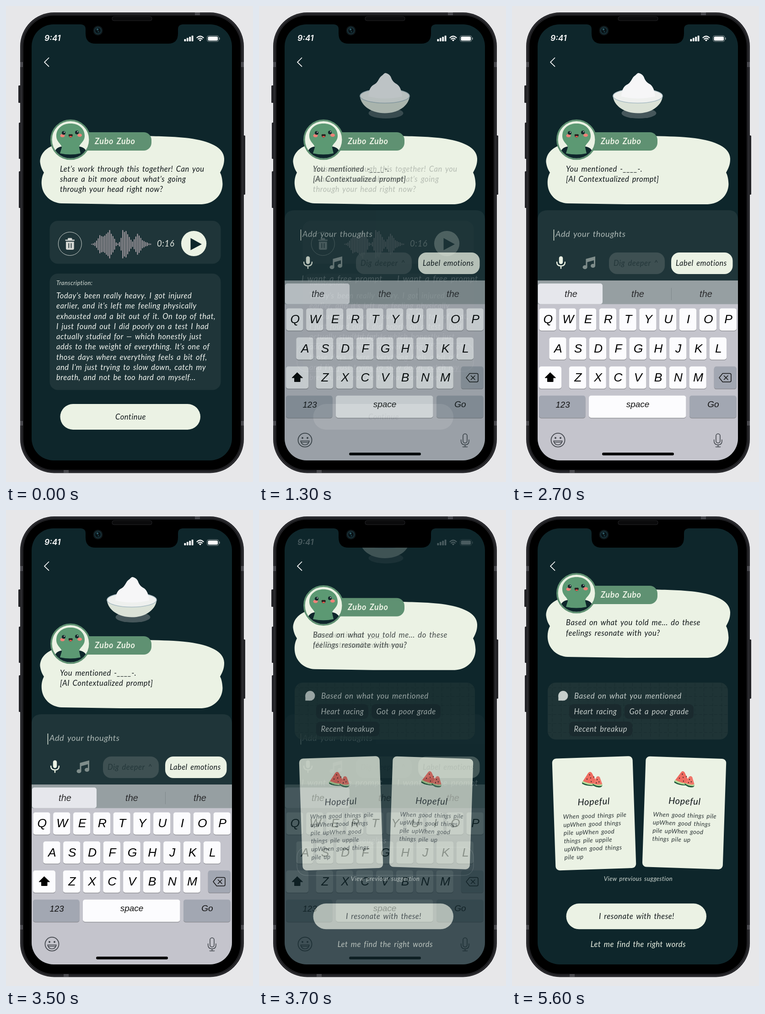
These frames come from a looping animation (540 by 1037 pixels, 5.7 s). An HTML page:

```html
<!DOCTYPE html>
<html lang="en">
<head>
<meta charset="utf-8">
<title>Journal flow</title>
<style>
  html, body { margin: 0; width: 100%; height: 100%; overflow: hidden; background: #e7e7e9; }
  svg { display: block; width: 100vw; height: 100vh; }
  text { font: italic 400 16.6px Lato, "Open Sans", sans-serif; letter-spacing: .033em; word-spacing: .12em; white-space: pre; }
  .name { font-weight: 700; }
  .key { font: italic 400 20px "Liberation Sans", Arial, sans-serif; letter-spacing: 0; word-spacing: 0; }
  .clock { font: italic 600 17.5px Inter, sans-serif; letter-spacing: 0; }
  .line { fill: none; stroke-linecap: round; stroke-linejoin: round; }
</style>
</head>
<body>
<svg id="stage" viewBox="0 0 540 1037" preserveAspectRatio="none"></svg>
<script>
const LOOP = 5700, MOVE = 300, STARTS = [1130, 3530];
const NIGHT = '#0e262b', CREAM = '#ebf2e4', GREEN = '#5f9172', INK = '#10171a';
const GLASS = 'rgba(235,242,228,.075)';

const rect = (x, y, w, h, r, fill, more = '') =>
  `<rect x="${x}" y="${y}" width="${w}" height="${h}" rx="${r}" fill="${fill}" ${more}/>`;
const circle = (x, y, r, fill, more = '') =>
  `<circle cx="${x}" cy="${y}" r="${r}" fill="${fill}" ${more}/>`;
const oval = (x, y, rx, ry, fill, more = '') =>
  `<ellipse cx="${x}" cy="${y}" rx="${rx}" ry="${ry}" fill="${fill}" ${more}/>`;
const path = (d, fill, more = '') => `<path d="${d}" fill="${fill}" ${more}/>`;
const line = (d, color, width = 2) =>
  `<path class="line" d="${d}" stroke="${color}" stroke-width="${width}"/>`;
const text = (x, y, s, fill = INK, size = 16.6, more = '') =>
  `<text x="${x}" y="${y}" fill="${fill}" style="font-size:${size}px" ${more}>${s}</text>`;
const mid = (x, y, s, fill, size) => text(x, y, s, fill, size, 'text-anchor="middle"');
const lines = (x, y, step, rows, fill, size) =>
  rows.map((s, i) => text(x, y + i * step, s, fill, size)).join('');
const group = (id, body) => `<g id="${id}">${body}</g>`;
const repeat = (n, f) => Array.from({ length: n }, (_, i) => f(i)).join('');

function phone() {
  const buttons = [[27, 173, 38], [28, 254, 79], [28, 360, 80], [518, 282, 129]]
    .map(([x, y, h]) => rect(x, y, 5, h, 1.5, '#242428')).join('');
  const bands = [[31, 122, 6, 11], [514, 122, 6, 11], [31, 904, 6, 10], [514, 904, 6, 10], [413, 14, 11, 6], [126, 1011, 11, 6]]
    .map(([x, y, w, h]) => rect(x, y, w, h, 0, '#4a4a4f')).join('');
  return buttons +
    rect(31, 14, 489, 1003.5, 74, '#1f1f22') +
    rect(33.5, 16.5, 484, 998.5, 71.5, 'none', 'stroke="#3b3b40" stroke-width="1.2"') + bands +
    rect(38, 21, 475, 989.5, 67, '#000');
}

function notch() {
  return path('M164 39V40Q174 41 174 50V60Q174 82 196 82H354Q376 82 376 60V50Q376 41 386 40V39Z', '#000') +
    rect(232, 23, 87, 9, 4, '#0a0a0b', 'stroke="#242427"') +
    circle(201, 53.5, 10.5, '#10191c') + circle(201, 53.5, 7, '#081014', 'stroke="#17323a" stroke-width="2"') +
    circle(200, 51, 2.2, '#2c5661') + circle(202, 56, 1.6, '#1d4047');
}

function status() {
  const bars = repeat(4, i => rect(389.5 + i * 5.4, 72 - i * 2.5, 3.8, 5 + i * 2.5, 1, '#fff'));
  return '<text class="clock" x="84" y="76" fill="#fff">9:41</text>' +
    bars + line('M417.5 69Q424.5 62.5 431.5 69M420.3 72Q424.5 68.3 428.7 72', '#fff', 2.3) +
    path('M421.7 74Q424.5 71.8 427.3 74L424.5 77Z', '#fff') +
    rect(439.5, 64.5, 25.5, 13, 4, 'none', 'stroke="#8b979a"') +
    rect(441.5, 66.5, 21.5, 9, 2.5, '#fff') + rect(466, 68.5, 1.6, 5, 1, '#8b979a');
}

function bubble() {
  const shape = 'M110 302C85 308 74 325 74.5 340C76 352 80 358 83 363C79 370 77 380 78 390C80 412 98 429 122 430' +
    'L250 432L428 432C453 431 473 413 473.5 388C473 376 471 368 468 363C473 354 477.5 345 477 332' +
    'C476 308 445 294 400 288C365 284 340 284 300 283L150 290Z';
  const mascot =
    path('M103 335Q104 306 124 306H158Q178 306 181 335Z', NIGHT) +
    path('M110 283C110 266 124 256 141 256C158 256 172 266 172 283C172 296 160 300 160 308L163 321Q141 326 118 321L122 308C121 300 110 296 110 283', '#5c9973') +
    oval(123.5, 282.5, 5, 3.5, '#ef8178') + oval(161, 281.5, 5, 3.5, '#ef8178') +
    circle(126, 276.5, 4, '#15262a') + circle(155, 275.5, 4, '#15262a') +
    circle(127.5, 275, 1.1, '#fff') + circle(156.5, 274, 1.1, '#fff') +
    path('M136.5 281Q137 278.5 141 279.5Q145.5 278.5 146 281Q145 286.5 141 286.5Q137.5 286.5 136.5 281', '#2a2020') +
    oval(141.3, 284.5, 3, 1.6, '#e6574c');
  return path(shape, CREAM) + rect(135, 275, 183, 40, 17, GREEN) +
    text(194, 301, 'Zubo Zubo', CREAM, 18, 'class="name"') +
    circle(141, 291.3, 42.2, CREAM, `stroke="${GREEN}" stroke-width="3.6"`) +
    `<g clip-path="url(#face)">${mascot}</g>` +
    group('ask1', lines(118, 361, 22, ['Let’s work through this together! Can you', 'share a bit more about what’s going', 'through your head right now?'])) +
    group('ask2', lines(118, 361, 22, ['You mentioned -____-.', '[AI Contextualized prompt]'])) +
    group('ask3', lines(118, 361, 22.5, ['Based on what you told me... do these', 'feelings resonate with you?']));
}

function recording() {
  const wave = [2, 4, 8, 16, 26, 40, 36, 34, 38, 46, 52, 62, 46, 36, 24, 8, 4, 10, 28, 62, 54, 58, 44, 32, 20, 12, 22, 34, 46, 38, 28, 18, 14, 10, 8, 4, 3];
  const bin = rect(129.5, 509, 20.5, 2.6, 1, '#d5d8d4') + rect(135, 505.5, 9.5, 4, 1.5, '#d5d8d4') +
    path('M131 513.5H148.7V528Q148.7 531 145.7 531H134Q131 531 131 528Z', '#d5d8d4') +
    line('M137.3 517.5V526.5M142.5 517.5V526.5', '#24383b', 1.8);
  return rect(95.5, 468, 374, 93.5, 18, GLASS) + circle(139.8, 518, 25.5, 'none', 'stroke="#cfd5d0"') + bin +
    wave.map((h, i) => rect(186.2 + i * 3.58, 519 - h / 2, 2.1, h, 1, '#a59da3')).join('') +
    text(330, 524, '0:16', '#e1e6df', 18.5) +
    circle(410.6, 517.5, 27.6, CREAM) + path('M403.5 505.5L428 519L403.5 532Z', NIGHT) +
    rect(95.5, 583, 374, 253.5, 18, GLASS) + text(110, 607.5, 'Transcription:', '#d8dfd8', 13) +
    lines(110, 637, 22.25, ['Today’s been really heavy. I got injured', 'earlier, and it’s left me feeling physically',
      'exhausted and a bit out of it. On top of that,', 'I just found out I did poorly on a test I had',
      'actually studied for — which honestly just', 'adds to the weight of everything. It’s one of',
      'those days where everything feels a bit off,', 'and I’m just trying to slow down, catch my',
      'breath, and not be too hard on myself...'], '#f3f6f1') +
    rect(118.5, 867, 306.5, 56, 28, CREAM) + mid(272.5, 900.5, 'Continue');
}

function bowl() {
  return oval(277.5, 233.5, 38, 11.5, '#46575b') +
    path('M220.5 196C223 218 246 233.5 275 233.5C304 233.5 327 218 329.5 196Z', '#dbe2d7') +
    oval(275, 196, 54, 15.5, '#eef0ee', 'stroke="#a9bcc4" stroke-width="1.6"') +
    path('M239 197C240 186 242 177 250 172C261 167 261 158 267 153C273 149 273 146 277 146C281 147 285 149 288 154C292 165 296 167 301 170C309 175 312 186 313 197Q275 206 239 197', '#f6f6f7');
}

const mic = (x, y, s, color) => `<g transform="translate(${x} ${y}) scale(${s})">` +
  rect(-4, -13, 8, 16, 4, color) + line('M-8.5 -1Q-8.5 7 0 7Q8.5 7 8.5 -1M0 7V12', color, 2.4) + '</g>';

function composer() {
  return path('M56 990V463Q58 445 78 445H474Q492 445 494 463V990Z', GLASS) +
    rect(90.8, 487, 1.4, 24, 0, CREAM) + text(95, 503, 'Add your thoughts', '#adb8b5', 18.2) +
    mic(107, 559, 1.05, CREAM) +
    oval(159.5, 569, 5, 4.3, '#7f8d8b') + oval(177, 566, 5, 4.3, '#7f8d8b') +
    path('M161.5 569V551L182 545.5V566H179V554L164.5 558V569Z', '#7f8d8b') +
    rect(212, 537, 122, 47, 18, '#3e5052') + text(222, 566, 'Dig deeper ^', '#24373a') +
    rect(348, 537, 134.5, 47, 18, CREAM) + text(358, 566, 'Label emotions', INK, 16.4);
}

function keyboard() {
  const label = (x, y, s, size, fill = '#111') =>
    `<text class="key" x="${x}" y="${y}" fill="${fill}" text-anchor="middle" style="font-size:${size}px">${s}</text>`;
  const key = (x, y, w, fill = '#fcfcfe') => rect(x, y + 1.3, w, 48.5, 5, '#898a8f') + rect(x, y, w, 48.5, 5, fill);
  const row = (letters, x, y) => repeat(letters.length, i =>
    key(x + i * 43.8, y, 37.3) + label(x + 19.6 + i * 43.8, y + 32.5, letters[i], 26.5, '#000'));
  return rect(56, 598, 438, 392, 0, '#c4c4cc') + rect(56, 598, 438, 51.5, 0, '#969fa2') +
    rect(57, 604.5, 141, 45, 5, '#e6e7ec') + rect(348, 614, 1, 27, 0, '#7f888b') +
    [129, 275, 424].map(x => label(x, 634, 'the', 20, '#2b2b2d')).join('') +
    row('QWERTYUIOP', 59.3, 658.7) + row('ASDFGHJKL', 81.3, 722) + row('ZXCVBNM', 124.7, 785.3) +
    key(59, 785.3, 49) + path('M83.5 798.5L95.5 810H90V818.5H77.5V810H72Z', '#000', 'stroke="#000" stroke-linejoin="round"') +
    key(441.7, 785.3, 49, '#a2a7b2') +
    line('M460.5 800.5H476Q479 800.5 479 803.5V816Q479 819 476 819H460.5L453 809.8ZM463.5 805.5L472 814M472 805.5L463.5 814', '#111', 1.5) +
    key(59, 848.7, 101.5, '#a2a7b2') + key(168, 848.7, 212.5) + key(388, 848.7, 102.5, '#a2a7b2') +
    label(111, 875, '123', 18.5) + label(275, 874, 'space', 19) + label(440, 874, 'Go', 19) +
    circle(100.5, 945.7, 15, 'none', 'stroke="#42464c" stroke-width="1.8"') +
    circle(95, 941, 2, '#42464c') + circle(106, 941, 2, '#42464c') +
    line('M91 947.5H110Q108 956 100.5 956Q93 956 91 947.5M93 950.5H108', '#42464c', 1.6) +
    rect(446, 932, 9, 20, 4.5, 'none', 'stroke="#42464c" stroke-width="1.6"') +
    line('M441.7 945V948Q442 956 450.5 956Q459 956 459 948V945M450.5 956V960.5M445.5 960.5H455.5', '#42464c', 1.6) +
    rect(197, 973, 157, 6, 3, '#000');
}

// Prompts behind the keyboard that only surface while screens dissolve.
function prompts() {
  return text(93, 601, 'I want a free prompt', '#fff', 18.5) + text(302, 601, 'I want a free prompt', '#fff', 18.5) +
    text(208, 726, 'thoughts', '#fff', 18) + rect(83, 735, 386, 61, 20, 'none', 'stroke="#fff"');
}

function melon() {
  const seeds = [[-5, -11], [-11, -2], [-3, -4], [4, -6], [-2, 4], [11, 0], [15, 5], [9, 7]];
  return path('M-22 4L13 12Q-8 16 -22 8Z', '#1f5a3d') + path('M-21 2L14 10L12 12Q-8 13 -22 5Z', '#b9dc9a') +
    path('M-20 2L-8 -15Q-4 -20 0 -15L12 9Q-8 9 -20 2', '#ee6b60') +
    path('M0 9L22 12Q22 18 13 17Q4 16 0 9', '#1f5a3d') + path('M1 8L22 10L21 14Q8 15 1 8', '#b9dc9a') +
    path('M2 8L10 -6Q14 -9 17 -5L22 10Q12 13 2 8', '#f0766a') +
    seeds.map(([x, y]) => oval(x, y, 1, 1.4, '#3a2426')).join('');
}

const card = (x, y, turn, h, rows) => `<g transform="translate(${x} ${y}) rotate(${turn})">` +
  rect(-88, -h / 2, 176, h, 9, CREAM) + `<g transform="translate(-2 -73)">${melon()}</g>` +
  mid(0, -18.5, 'Hopeful', INK, 20) + lines(-68, 10, 17.7, rows, '#2c3536', 13.5) + '</g>';

function suggestions() {
  const soft = '#c6cecb';
  const grid = repeat(20, i => `M${88 + i * 19.5} 377V499`) + repeat(6, i => `M79 ${387 + i * 19.5}H471`);
  const chip = (x, y, w, s) => rect(x, y, w, 32, 9, '#1a2a2e') + text(x + 10.5, y + 21.5, s, soft);
  return rect(78, 376, 394, 124, 18, '#1f3436') +
    `<path d="${grid}" stroke="#192c2f" stroke-dasharray="7 4" fill="none"/>` +
    circle(111.8, 404.7, 10.6, soft) + path('M101.5 404L101.3 415.2H112Z', soft) +
    text(136, 410.5, 'Based on what you mentioned', soft, 16.9) +
    chip(125, 423, 114, 'Heart racing') + chip(246, 423, 151, 'Got a poor grade') + chip(125, 461, 138, 'Recent breakup') +
    card(179.5, 660.7, -1.9, 244, ['When good things pile', 'upWhen good things', 'pile upWhen good', 'things pile uppile', 'upWhen good things', 'pile up']) +
    card(376.6, 659.7, 1.9, 241, ['When good things pile', 'upWhen good things', 'pile upWhen good', 'things pile up']) +
    mid(276, 808, 'View previous suggestion', '#cfd8d2', 13.2) +
    rect(118.5, 857.3, 306.5, 56, 28, CREAM) + mid(272.5, 891, 'I resonate with these!') +
    mid(276, 951.5, 'Let me find the right words', CREAM);
}

const stage = document.getElementById('stage');
stage.innerHTML =
  `<defs><clipPath id="screen">${rect(56, 40, 438, 950, 48, '#000')}</clipPath>` +
  `<clipPath id="face">${circle(141, 291.3, 40.5, '#000')}</clipPath></defs>` +
  rect(0, 0, 540, 1037, 0, '#e7e7e9') + phone() +
  `<g clip-path="url(#screen)">` + rect(56, 40, 438, 950, 0, NIGHT) +
  group('recording', recording()) + group('composer', composer()) + group('prompts', prompts()) +
  group('suggestions', suggestions()) + group('keyboard', keyboard()) + group('bowl', bowl()) +
  group('status', status()) + line('M93.5 113L84 122.3L93.5 131.6', '#fff', 1.7) + '</g>' +
  group('bubble', bubble()) + notch();

const parts = Object.fromEntries([...stage.querySelectorAll('g[id]')].map(g => [g.id, g]));
const fade = (v, ...ids) => ids.forEach(id => parts[id].setAttribute('opacity', v));
const lift = (id, y) => parts[id].setAttribute('transform', `translate(0 ${y})`);

// Ease-out curve, cubic-bezier(0, 0, .58, 1), solved by bisection.
function ease(x) {
  if (x <= 0 || x >= 1) return x <= 0 ? 0 : 1;
  let lo = 0, hi = 1;
  for (let i = 0; i < 20; i++) {
    const s = (lo + hi) / 2;
    if (3 * (1 - s) * s * s * .58 + s ** 3 < x) lo = s; else hi = s;
  }
  return lo * lo * (3 - 2 * lo);
}

function draw(now) {
  const t = now % LOOP;
  const [a, b] = STARTS.map(start => ease((t - start) / MOVE));
  fade(1 - a, 'recording', 'ask1');
  fade(a * (1 - b), 'composer', 'keyboard', 'ask2', 'bowl');
  fade(b, 'suggestions', 'ask3');
  fade(1 - b, 'status');
  fade(a * (1 - a) + b * (1 - b), 'prompts');
  lift('bubble', -110 * b);
  lift('bowl', -170 * b);
  requestAnimationFrame(draw);
}
draw(performance.now());
</script>
</body>
</html>
```
